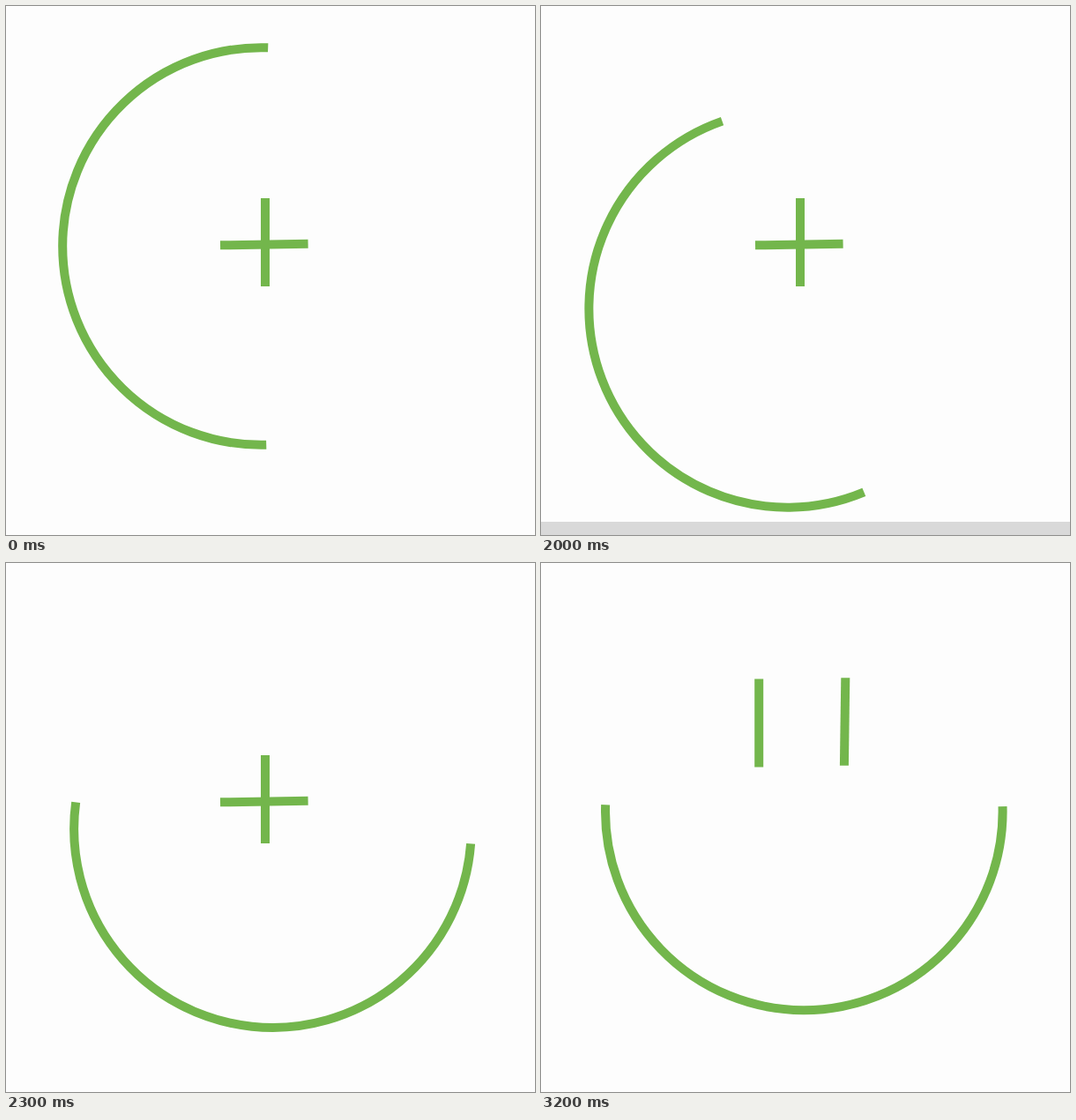
These frames come from a looping animation (600x600 px, 3.5 s). An HTML page:

```html
<!DOCTYPE html>
<html lang="en">
<head>
<meta charset="utf-8">
<title>Smile</title>
<style>
  html, body { margin: 0; width: 100%; height: 100%; overflow: hidden; background: #fdfdfd; }
  svg { display: block; width: 100%; height: 100%; }
  .line { fill: none; stroke: #73b64c; stroke-width: 10; }
</style>
</head>
<body>
<svg viewBox="0 0 600 600">
  <rect id="bar" y="585" width="600" height="15" fill="#c9c9c9"/>
  <path id="mouth" class="line" d="M-225.2-7A225.3 225.3 0 1 0 225.2-7"/>
  <path id="left" class="line" d="M0-50V50"/>
  <path id="right" class="line" d="M-49.8 0H49.8"/>
</svg>
<script>
const LOOP = 3500, STEP = 100;
const [bar, mouth, left, right] =
  ['bar', 'mouth', 'left', 'right'].map(id => document.getElementById(id));

const clamp = v => Math.min(1, Math.max(0, v));
const ramp = (t, start, length) => clamp((t - start) / length);
const smooth = u => u * u * (3 - 2 * u);
const easeOut = u => 1 - (1 - u) ** 2.9;
const mix = (a, b, k) => a + (b - a) * k;
const bend = (c, k) => 2 * (1 - k) * k * c + k * k;
const place = (el, x, y, angle) =>
  el.setAttribute('transform', `translate(${x} ${y}) rotate(${angle})`);

// The mouth drops, swings under and rises as it turns a quarter.
function drawMouth(k) {
  const x = mix(289.2, 298.3, k) - 12 * Math.sin(2 * Math.PI * k);
  const y = mix(272.5, 282.2, k) + 102 * Math.sin(Math.PI * k);
  place(mouth, x, y, mix(90.25, .25, k));
}

// The plus splits into two eyes; its crossbar turns upright on a curved path.
function drawEyes(k) {
  place(left, mix(294, 247.2, k), mix(268, 181.5, k), 0);
  place(right, mix(292.8, 344.6, bend(.08, k)), mix(270.5, 180, bend(.73, k)), mix(-1, 90.8, k));
}

function draw(time) {
  const t = Math.floor(time % LOOP / STEP) * STEP;
  bar.setAttribute('opacity', Math.min(ramp(t, 200, 300), 1 - ramp(t, 1900, 320)));
  drawMouth(t < 2000 ? 0 : smooth(ramp(t, 1822, 565))); // starts with a jump
  drawEyes(easeOut(ramp(t, 2500, 600)));
}

const start = performance.now();
function tick() {
  draw(performance.now() - start);
  requestAnimationFrame(tick);
}
tick();
</script>
</body>
</html>
```
